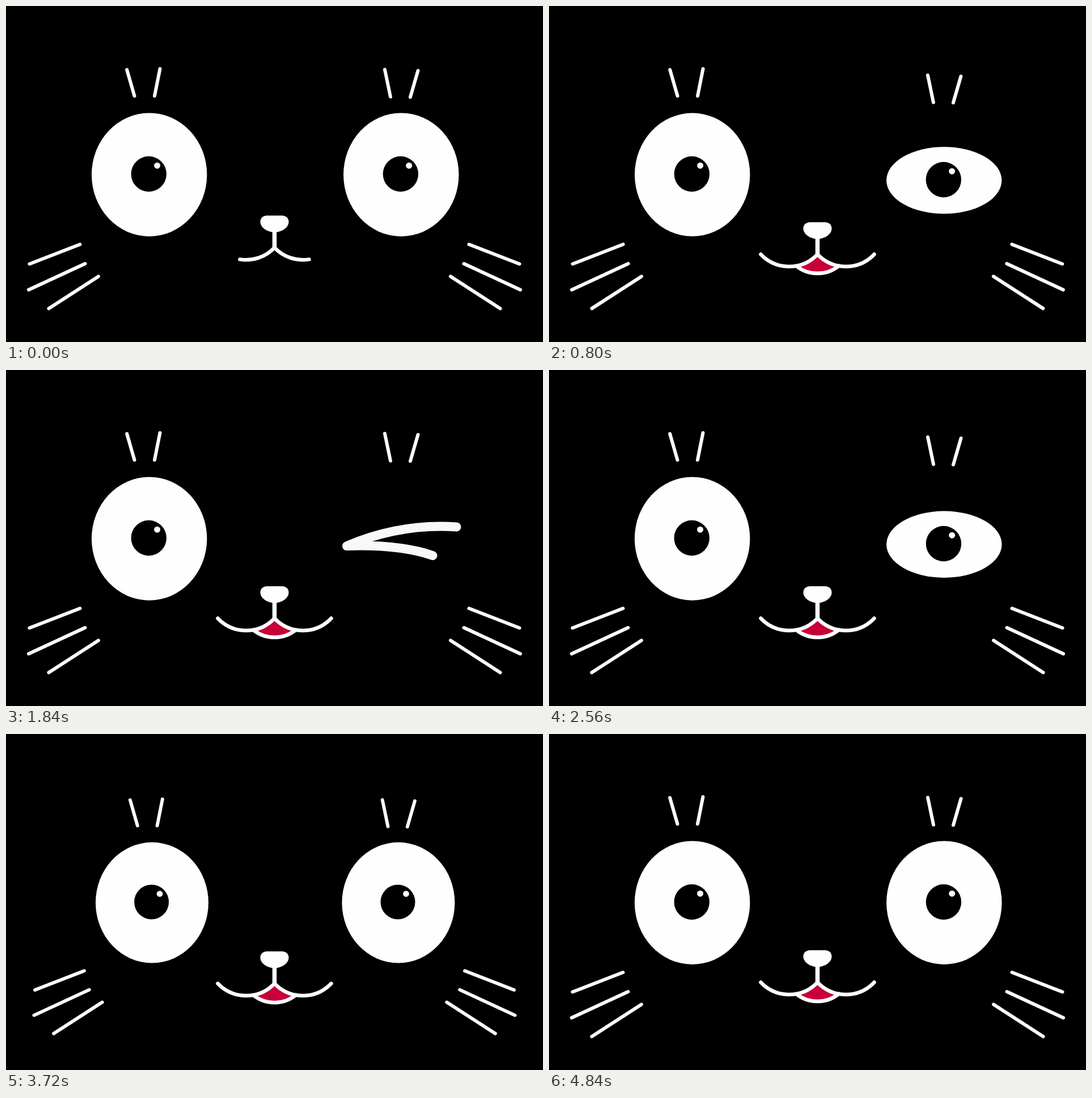
An HTML page with a canvas for the animation above (5 s loop, 947 px wide and 592 px high).

```html
<!DOCTYPE html>
<html lang="en">
<head>
<meta charset="utf-8">
<title>Winking cat</title>
<style>
  html, body { margin: 0; width: 100%; height: 100%; overflow: hidden; background: #000; }
  canvas { display: block; }
</style>
</head>
<body>
<canvas id="stage" width="947" height="592"></canvas>
<script>
const ctx = document.getElementById('stage').getContext('2d');
const LOOP = 5000, STEP = 40, CX = 473.5, CY = 296, RAD = Math.PI / 180;
const WHITE = '#fefefe';

const clamp = v => Math.max(0, Math.min(1, v));
const expoOut = v => v <= 0 ? 0 : v >= 1 ? 1 : 1 - 2 ** (-10 * v);
const smooth = v => v < .5 ? 2 * v * v : 1 - 2 * (1 - v) ** 2;

// What is left of an offset of 1 during a one-second elastic settle
function settle(ms) {
  const u = ms / 1000;
  if (u <= 0) return 1;
  return u >= 1 ? 0 : -(2 ** (-10 * u)) * Math.sin((u - .075) * 2 * Math.PI / .3);
}

// Wind up from 0 to 1 between a and b, then spring back to 0
const spring = (t, a, b) => t < b ? expoOut((t - a) / (b - a)) : settle(t - b);

function line(x1, y1, x2, y2) {
  ctx.beginPath();
  ctx.moveTo(x1, y1);
  ctx.lineTo(x2, y2);
  ctx.stroke();
}

function oval(x, y, rx, ry, color) {
  ctx.fillStyle = color;
  ctx.beginPath();
  ctx.ellipse(x, y, rx, ry, 0, 0, 2 * Math.PI);
  ctx.fill();
}

function eye(x, dy, open) {
  oval(x, 297.2 + dy, 101.7, 108.7 * open, WHITE);
  oval(x - .9, 296 + dy, 31.2, 31.2, '#000');
  oval(x + 13.9, 281.2 + dy, 5.5, 5.5, WHITE);
}

function wink(dy) {
  ctx.save();
  ctx.translate(0, dy);
  ctx.strokeStyle = '#f8f8f8';
  ctx.lineWidth = 16;
  ctx.beginPath();
  ctx.moveTo(794.5, 276.5);
  ctx.quadraticCurveTo(695, 270, 601, 310);
  ctx.quadraticCurveTo(695, 307, 752.5, 327);
  ctx.stroke();
  ctx.restore();
}

function whiskers(side) {
  ctx.save();
  ctx.translate(CX, 0);
  ctx.scale(side, 1);
  line(343, 420, 432, 454.5);
  line(334, 454, 433.5, 500);
  line(310.5, 476.5, 398, 533);
  ctx.restore();
}

// Nose, lips and tongue; the lips are two trimmed arcs of one radius
function muzzle(dy, open) {
  const r = 69, lipX = 50, lipY = 390;
  ctx.save();
  ctx.translate(CX, dy);
  ctx.strokeStyle = WHITE;
  ctx.lineWidth = 6.5;

  if (open > .02) {
    const a = (46.5 - 36.1 * open) * RAD;
    const x = lipX - r * Math.sin(a), y = lipY + r * Math.cos(a);
    const tongueR = 60 * open, half = Math.asin(clamp(x / tongueR));
    const top = y - tongueR * Math.cos(half);
    ctx.fillStyle = '#c70039';
    ctx.beginPath();
    ctx.arc(-lipX, lipY, r, 43.5 * RAD, Math.PI / 2 - a);
    ctx.arc(0, top, tongueR, Math.PI / 2 + half, Math.PI / 2 - half, true);
    ctx.arc(lipX, lipY, r, Math.PI / 2 + a, 136.5 * RAD);
    ctx.fill();
    ctx.beginPath();
    ctx.arc(0, top, tongueR, Math.PI / 2 - half, Math.PI / 2 + half);
    ctx.stroke();
  }

  const end = (9.2 + 37.3 * open) * RAD;
  ctx.beginPath();
  ctx.arc(-lipX, lipY, r, Math.PI / 2 + end, 43.5 * RAD, true);
  ctx.arc(lipX, lipY, r, 136.5 * RAD, Math.PI / 2 - end, true);
  ctx.stroke();
  ctx.lineWidth = 7.5;
  line(0, 406, 0, 437);

  ctx.fillStyle = WHITE;
  ctx.beginPath();
  ctx.moveTo(-13, 381);
  ctx.lineTo(13, 381);
  ctx.bezierCurveTo(21, 381, 25, 386, 25, 392);
  ctx.bezierCurveTo(25, 402, 13, 410.3, 0, 410.3);
  ctx.bezierCurveTo(-13, 410.3, -25, 402, -25, 392);
  ctx.bezierCurveTo(-25, 386, -21, 381, -13, 381);
  ctx.fill();
  ctx.restore();
}

function draw(t) {
  const shrink = .018 * spring(t, 230, 440) + .0235 * spring(t, 3640, 3850);
  const lift = -4.5 * spring(t, 0, 200);
  const smile = smooth(clamp(t / 400));
  const closing = spring(t, 640, 850);
  const opening = t < 2560 ? 0 : settle(t - 2560);
  const winking = t > 850 && t < 2560;
  const squash = t < 2560 ? closing : 1 - expoOut((t - 2560) / 120);
  const rightBrow = lift + 10 * closing + 8 * spring(t, 2520, 2705);

  ctx.fillStyle = '#000';
  ctx.fillRect(0, 0, 947, 592);
  ctx.lineCap = ctx.lineJoin = 'round';

  ctx.save();
  ctx.translate(CX, CY);
  ctx.scale(1 - shrink, 1 - shrink);
  ctx.translate(-CX, -CY);
  ctx.strokeStyle = WHITE;
  ctx.lineWidth = 6;
  whiskers(-1);
  whiskers(1);
  line(213.2, 112.3 + lift, 226.5, 158.5 + lift);
  line(271.5, 110.8 + lift, 262, 158.5 + lift);
  line(668, 112 + rightBrow, 678, 160 + rightBrow);
  line(726.5, 114 + rightBrow, 713, 160.5 + rightBrow);
  eye(252.7, 0, 1);
  if (winking) wink(10 * closing);
  else eye(696.8, 10 * (closing + opening), 1 - .46 * squash);
  ctx.restore();

  muzzle(96 * shrink - 11.7 * (1 - smile), smile);
}

const start = performance.now();
function tick() {
  const t = (performance.now() - start) % LOOP;
  draw(Math.floor(t / STEP) * STEP);
  requestAnimationFrame(tick);
}
tick();
</script>
</body>
</html>
```
